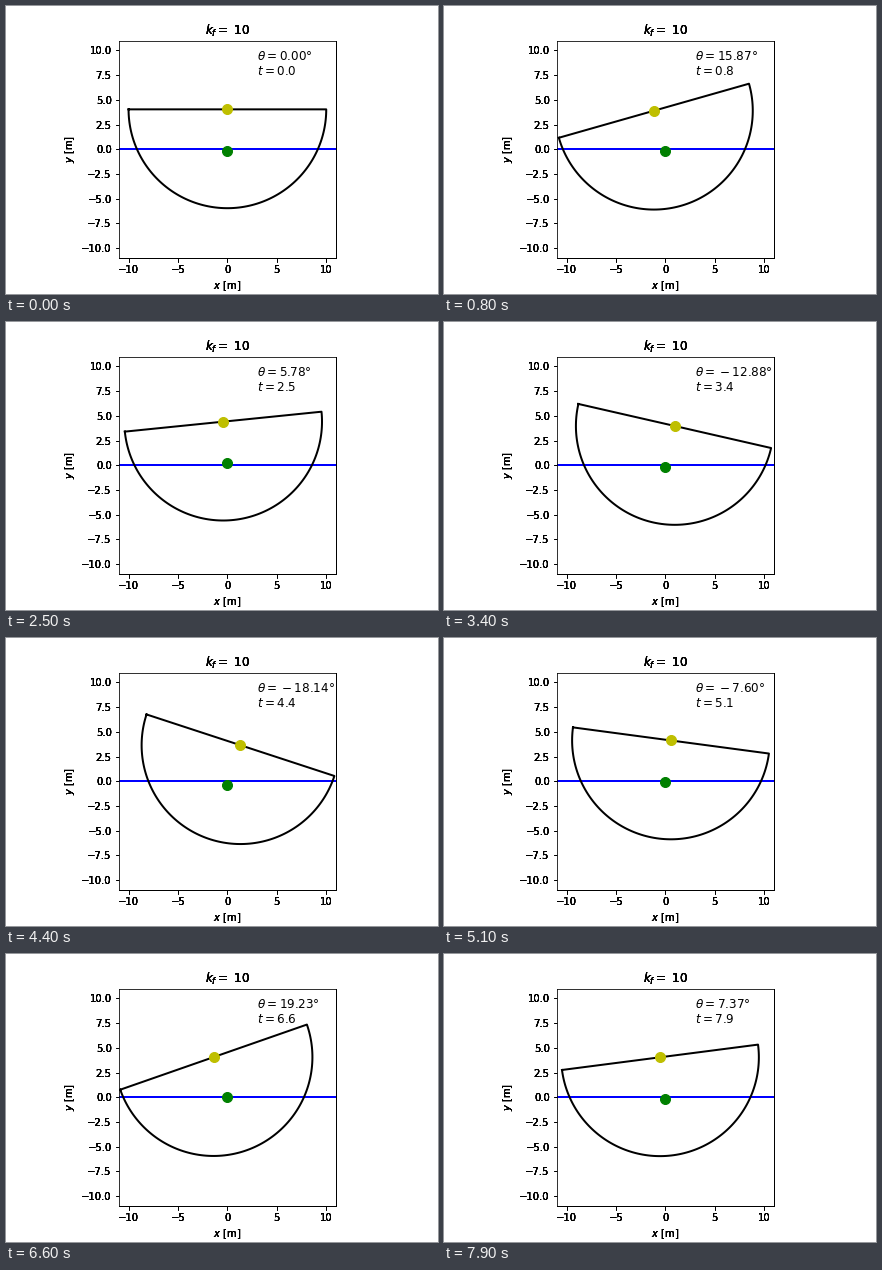
Recreate the animation shown at these times as a matplotlib script. Size 432x288 px, loop 8000 ms.

```python
import numpy as np
import matplotlib.pyplot as plt
from matplotlib.animation import FuncAnimation

# Floating half disc: free roll and heave
R, G = 10.0, 9.81
H = 4 * R / (3 * np.pi)              # centre of mass below the deck
MASS = 0.5 * np.pi * R**2 / 2        # half the density of water
INERTIA = MASS * (R**2 / 2 - H**2)
BETA = 2.3099                        # wetted sector at rest
OMEGA0 = 0.4
FRAMES, STEP, SUB = 80, 0.1, 20


def rate(s):
    theta, y, omega, v = s
    c = y + H * np.cos(theta)
    wet = R**2 * np.arccos(c / R) - c * np.sqrt(R**2 - c**2)
    lift = G * wet
    return np.array([omega, v, -lift * H * np.sin(theta) / INERTIA,
                     lift / MASS - G])


def simulate():
    s = np.array([0.0, R * np.cos(BETA / 2) - H, OMEGA0, 0.0])
    h = STEP / SUB
    states = []
    for _ in range(FRAMES):
        states.append(s[:2])
        for _ in range(SUB):
            a = rate(s)
            b = rate(s + h / 2 * a)
            c = rate(s + h / 2 * b)
            d = rate(s + h * c)
            s = s + h / 6 * (a + 2 * b + 2 * c + d)
    return states


plt.rcParams.update({"font.family": "DejaVu Sans", "font.size": 10})
fig = plt.figure(figsize=(6, 4), dpi=72)


def make_axes():
    ax = fig.add_axes([0.125, 0.125, 0.775, 0.755])
    ax.set(xlim=(-11, 11), ylim=(-11, 11), aspect="equal",
           xticks=np.arange(-10, 11, 5), yticks=np.arange(-10, 10.1, 2.5),
           xlabel="$x$ [m]", ylabel="$y$ [m]")
    ax.set_title("$k_f = $ 10", fontsize=12)
    return ax


# Stacked copies thicken the lettering outside the plot
for _ in range(5):
    ax = make_axes()

ax.axhline(0, color="b", lw=2)
hull, = ax.plot([], [], "k", lw=2)
deck, = ax.plot([], [], "yo", ms=10)
mass, = ax.plot([], [], "go", ms=10)
angle = ax.text(3, 9, "", fontsize=12)
clock = ax.text(3, 7.5, "", fontsize=12)

states = simulate()
arc = np.linspace(np.pi, 2 * np.pi, 120)


def draw(i):
    theta, y = states[i]
    cx, cy = -H * np.sin(theta), y + H * np.cos(theta)
    a = np.append(arc, np.pi) + theta
    hull.set_data(cx + R * np.cos(a), cy + R * np.sin(a))
    deck.set_data([cx], [cy])
    mass.set_data([0], [y])
    angle.set_text(rf"$\theta = {np.degrees(theta):.2f}$°")
    clock.set_text(f"$t = {i * STEP:.1f}$")
    return hull, deck, mass, angle, clock


anim = FuncAnimation(fig, draw, frames=FRAMES, interval=100, repeat=True)
plt.show()
```
